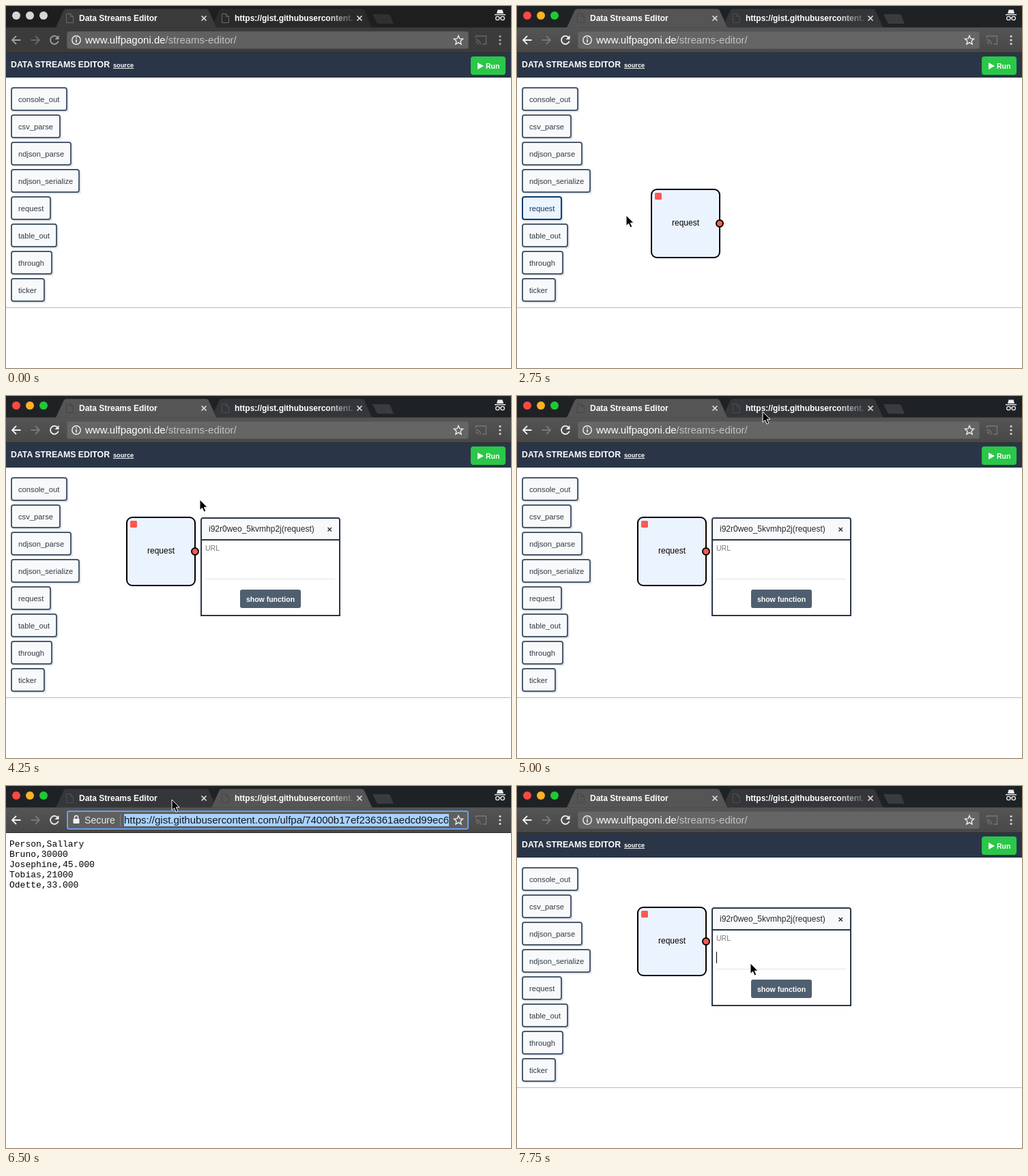
Recreate the animation shown at these times as an HTML page. Size 740 px wide and 531 px high, loop 8000 ms.

```html
<!DOCTYPE html>
<html lang="en">
<head>
<meta charset="utf-8">
<title>Data Streams Editor</title>
<style>
  html, body { margin: 0; width: 100%; height: 100%; overflow: hidden; background: #fff; }
  svg { display: block; font-family: "Liberation Sans", Arial, sans-serif; }
  text { white-space: pre; }
  .mono { font: 13px "Liberation Mono", Courier, monospace; }
</style>
</head>
<body>
<svg id="stage" width="740" height="531" viewBox="0 0 740 531"></svg>
<script>
const LOOP = 8000, STEP = 250;
const NAVY = '#2a3648', SLATE = '#4b5a6c', RED = '#fd5952';

// Each key is held until the next one: [ms, x, y]
const POINTER = [
  [250, 616, 42], [500, 159, 222], [1250, 62, 298], [1500, 42, 312], [2250, 42, 300],
  [2500, 92, 304], [2750, 160, 307], [3000, 241, 319], [3250, 249, 312], [3500, 223, 235],
  [3750, 221, 228], [4250, 284, 152], [4500, 345, 71], [4750, 357, 38], [5000, 360, 23],
  [5500, 364, 42], [6000, 334, 45], [6250, 272, 30], [6500, 243, 20], [7000, 262, 84],
  [7250, 322, 215], [7500, 342, 260]
];
const NODE = [[2500, 196, 268], [3250, 204, 261], [3500, 178, 184], [3750, 176, 177]];
const BUTTONS = [['console_out', 83], ['csv_parse', 73], ['ndjson_parse', 89], ['ndjson_serialize', 101],
  ['request', 59], ['table_out', 68], ['through', 61], ['ticker', 50]];
const CSV = ['Person,Sallary', 'Bruno,30000', 'Josephine,45.000', 'Tobias,21000', 'Odette,33.000'];
const RAW_URL = 'https://gist.githubusercontent.com/ulfpa/74000b17ef236361aedcd99ec6';

const DEFS = `<defs>
  <linearGradient id="bar" x2="0" y2="1"><stop stop-color="#555"/><stop offset="1" stop-color="#474747"/></linearGradient>
  <linearGradient id="fade" gradientUnits="userSpaceOnUse" x1="470" x2="510" y1="0" y2="0">
    <stop stop-color="#fff"/><stop offset="1" stop-color="#fff" stop-opacity=".1"/></linearGradient>
  <clipPath id="field"><rect x="173" y="38" width="475" height="24"/></clipPath>
</defs>`;

const between = (t, a, b) => t >= a && t < b;
const held = (keys, t) => keys.filter(k => k[0] <= t).pop();
const rect = (x, y, w, h, fill, r = 0, more = '') =>
  `<rect x="${x}" y="${y}" width="${w}" height="${h}" rx="${r}" fill="${fill}" ${more}/>`;
const circle = (x, y, r, fill, more = '') => `<circle cx="${x}" cy="${y}" r="${r}" fill="${fill}" ${more}/>`;
const path = (d, fill, more = '') => `<path d="${d}" fill="${fill}" ${more}/>`;
const line = (d, color, w = 1, more = '') => path(d, 'none', `stroke="${color}" stroke-width="${w}" ${more}`);
const text = (x, y, size, fill, s, more = '') =>
  `<text x="${x}" y="${y}" font-size="${size}" fill="${fill}" ${more}>${s}</text>`;
const BOLD = 'font-weight="700" ', MID = 'text-anchor="middle" ';

function tab(x, title, fill, titleFill, icon) {
  return path(`M${x - 1} 32q3 0 4-3l10-22q1.500-3 4-3h205q3 0 4.500 3l10 22q1 3 4 3z`,
      fill, 'stroke="#222" stroke-width=".6"') +
    line(`M${x + 17.5} 11.5h6l4 4v9h-10zM${x + 23.5} 11.5v4h4`, icon) +
    text(x + 36, 22, 12, titleFill, title, BOLD) +
    line(`M${x + 215.5} 14.5l7 7m0-7l-7 7`, '#dedede', 1.7);
}

function toolbar(focused, raw, selected) {
  const ink = focused ? '#f2f2f2' : '#a0a0a0', dim = focused ? '#777' : '#686868';
  let s = line('M21.500 50H9m6-6l-6 6 6 6', ink, 1.8) + line('M36.500 50H49m-6-6l6 6-6 6', dim, 1.8) +
    line('M76 46.500a6 6 0 1 0 .8 5', ink, 1.8) + path('M77.500 43v6h-6z', ink) +
    (selected ? rect(90, 37, 587, 26, '#5f5f5f', 2.5, 'stroke="#6ba0e6" stroke-width="2"')
      : rect(89.5, 37.5, 588, 25, focused ? '#656565' : '#606060', 3, `stroke="${focused ? '#5c5c5c' : '#555'}"`));
  if (raw) {
    s += rect(98.5, 48, 9, 7, '#f2f2f2', 1) + line('M100.500 48v-2a2.500 2.500 0 0 1 5 0v2', '#f2f2f2', 1.4) +
      text(115, 55, 14.2, '#e8e8e8', 'Secure') + line('M167.500 41v18', '#858585') +
      (selected ? rect(173, 41, 476, 18, '#a9d2fd') : '') +
      text(173, 55, 15, selected ? '#111a24' : '#f2f2f2', RAW_URL, 'clip-path="url(#field)"');
  } else {
    s += circle(103, 50, 6.2, 'none', 'stroke="#f2f2f2" stroke-width="1.4"') +
      line('M103 49v4.500M103 46v1.700', '#f2f2f2', 1.6) +
      text(116, 55, 15, '#fff', 'www.ulfpagoni.de<tspan fill="#c3c3c3">/streams-editor/</tspan>');
  }
  return s + line('M663 43.500l1.900 4.400 4.700.4-3.600 3.100 1.100 4.700-4.100-2.500-4.100 2.500 1.100-4.700-3.600-3.100 4.700-.4z', '#f2f2f2', 1.3) +
    line('M688.500 47v-3h15v12h-5M688.500 49.500a7 7 0 0 1 7 7M688.500 53a3.500 3.500 0 0 1 3.500 3.500', dim, 1.3) +
    [44.5, 50, 55.5].map(y => circle(724, y, 1.6, focused ? '#d8d8d8' : '#aaa')).join('');
}

function chrome(focused, raw, selected) {
  const active = focused ? '#555' : '#3b3b3b', idle = focused ? '#34363a' : '#2a2a2a';
  const lights = focused ? ['#fc4844', '#fdb125', '#1ec936'] : ['#d6d6d6', '#d6d6d6', '#d6d6d6'];
  const icon = on => on && focused ? '#454545' : focused ? '#4b4d50' : '#6b6b6b';
  const tabs = [
    tab(71, 'Data Streams Editor', raw ? idle : active, '#fff', icon(!raw)),
    tab(299, 'https://gist.githubusercontent.', raw ? active : idle, 'url(#fade)', icon(raw))
  ];
  if (!raw) tabs.reverse();
  return rect(0, 0, 740, 32, focused ? '#1f2225' : '#1e1e1e') +
    lights.map((c, i) => circle(15 + 20 * i, 14, 6, c)).join('') +
    path('M537 12h23q2 0 3 2l5 12h-22q-2 0-3-2z', focused ? '#393b3e' : '#303030') + tabs.join('') +
    path('M719 11l1.500-5.500h7l1.500 5.500z', '#eee') + rect(716, 12, 16, 1.4, '#eee') +
    line('M723 17.500q1-1 2 0', '#eee', 1.1) +
    [720.3, 727.7].map(x => circle(x, 18, 2.7, 'none', 'stroke="#eee" stroke-width="1.2"')).join('') +
    rect(0, 31.5, 740, 37.5, focused ? 'url(#bar)' : '#3b3b3b') +
    toolbar(focused, raw, selected) + rect(0, 68, 740, 1, '#2c2c2c');
}

function button([label, w], i, lit) {
  const y = 119 + 40 * i;
  return rect(9, y + 2, w, 35, '#e3e8ee', 4) +
    rect(8, y + 1, w - 2, 33, lit ? '#ebf4ff' : '#f8f9fa', 3, `stroke="${lit ? '#073d73' : SLATE}" stroke-width="2"`) +
    text(18, y + 22, 11.2, lit ? '#12365c' : '#323b46', label);
}

function node(x, y, hover) {
  return rect(x + 1, y + 1, 100, 100, hover ? '#cbe4fe' : '#ebf3fe', 8, 'stroke="#000" stroke-width="2"') +
    rect(x + 6, y + 6, 10, 10, RED, 1.5) +
    circle(x + 101, y + 51, 5, RED, 'stroke="#000" stroke-width="2"') +
    text(x + 51, y + 54, 12, '#000', 'request', MID);
}

function panel(caret) {
  return path('M286 322V182q0-3 3-3h197q3 0 3 3v140z', '#fff', `stroke="${NAVY}" stroke-width="2"`) +
    path('M287 210v-27q0-3 3-3h195q3 0 3 3v27z', '#f8f9fa') + rect(286, 210, 203, 2, NAVY) +
    text(297, 199, 12, '#222b36', 'i92r0weo_5kvmhp2j(request)') +
    line('M471.500 193l5.500 5.500m0-5.500l-5.500 5.500', '#222', 1.2) +
    text(292, 227, 10.5, '#777', 'URL') + rect(292, 268, 190, 1, '#e4e4e4') +
    rect(343, 284, 89, 27, '#4f5f70', 3) + text(387.5, 302, 10.5, '#fff', 'show function', BOLD + MID) +
    (caret ? rect(292, 243, 1, 17, '#000') : '');
}

function editor(t) {
  const at = held(NODE, t);
  return rect(0, 69, 740, 36, NAVY) +
    text(7, 90, 12.3, '#fff', 'DATA STREAMS EDITOR', BOLD) +
    text(157, 90, 9.2, '#fff', 'source', BOLD + 'text-decoration="underline"') +
    rect(681, 74, 51, 27, '#2ac748', 4) + path('M691 83l9 5-9 5z', '#fff') +
    text(703, 92, 10.5, '#fff', 'Run', BOLD) +
    BUTTONS.map((b, i) => button(b, i, i === 4 && between(t, 2250, 3000))).join('') +
    line('M0 442.500H740', '#777', 1, 'stroke-dasharray="1 1"') +
    (at ? node(at[1], at[2], between(t, 3000, 4250)) : '') +
    (t >= 4000 ? panel(t >= 7500) : '');
}

function pointer(t) {
  const at = held(POINTER, t);
  return at ? path(`M${at[1]} ${at[2]}v15.500l3.600-3.300 2.500 5.800 2.700-1.200-2.500-5.600h4.700z`, '#000',
    'stroke="#fff" stroke-width="1" stroke-linejoin="round"') : '';
}

function scene(t) {
  const raw = between(t, 5250, 6750);
  const page = raw ? CSV.map((s, i) => `<text class="mono" x="5" y="${89 + 15 * i}">${s}</text>`).join('') : editor(t);
  return DEFS + rect(0, 0, 740, 531, '#fff') + page + chrome(t >= 1750, raw, raw && t >= 5750) + pointer(t);
}

const stage = document.getElementById('stage');
let shown = -1;
function tick() {
  const t = Math.floor(performance.now() % LOOP / STEP) * STEP;
  if (t !== shown) stage.innerHTML = scene(shown = t);
  requestAnimationFrame(tick);
}
tick();
</script>
</body>
</html>
```
